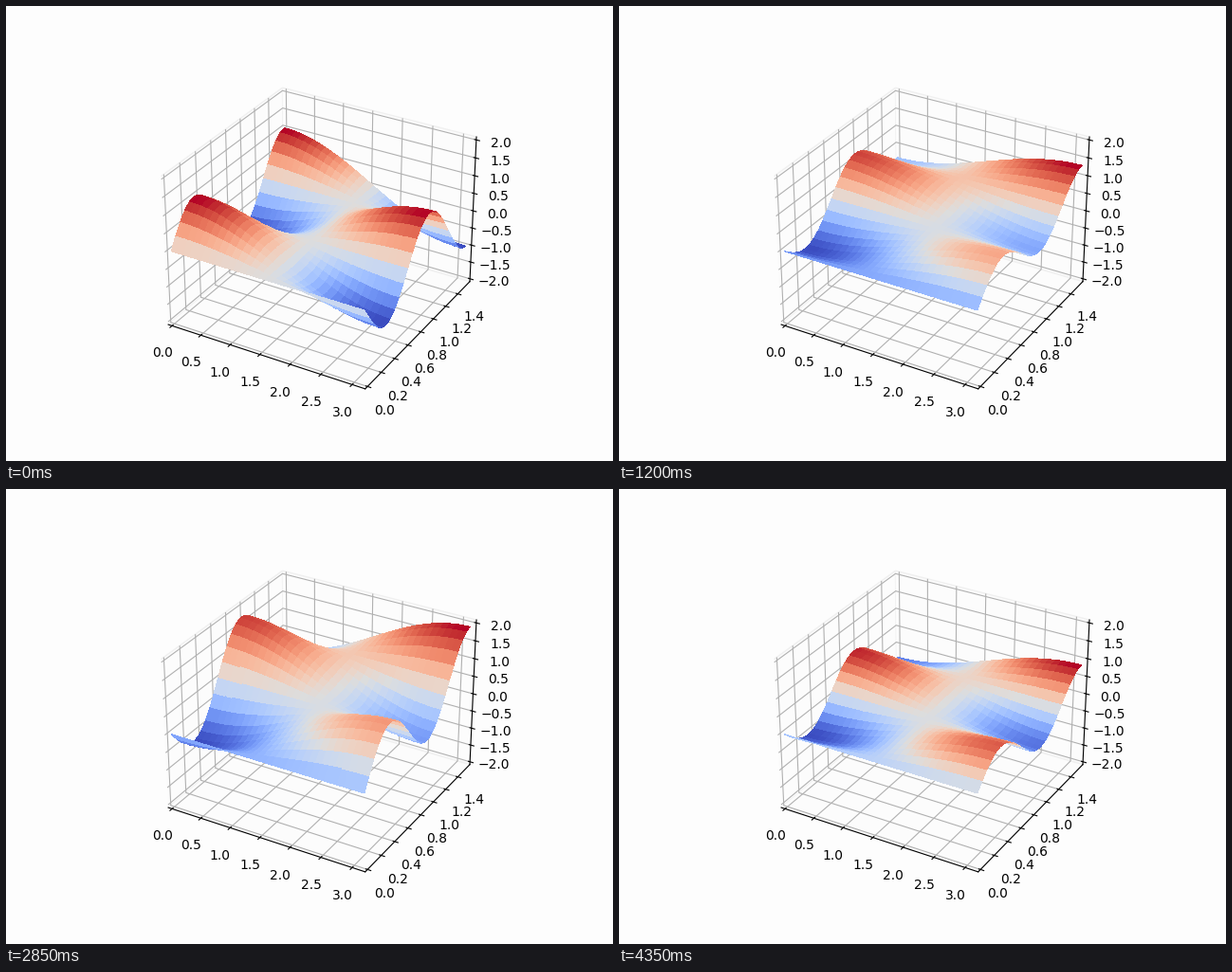
Recreate the animation shown at these times as a matplotlib script. Size 640 by 480 pixels, loop 4.5 s.

```python
import numpy as np
import matplotlib.pyplot as plt
from matplotlib.animation import FuncAnimation

FRAMES, INTERVAL, DT = 30, 150, 0.1
LX, LY = np.pi, np.pi / 2
PAD = 1 / 48  # gap between the data and the walls of the box

x, y = np.meshgrid(np.linspace(0, LX, 31), np.linspace(0, LY, 51))


def wave(t):
    """Two standing waves of a membrane held along y = 0."""
    slow = np.sin(y) * np.sin(t)
    fast = np.cos(x) * np.sin(5 * y) * np.cos(np.sqrt(26) * t)
    return slow + fast


def padded(low, high):
    gap = (high - low) * PAD
    return low - gap, high + gap


fig = plt.figure(figsize=(6.4, 4.8), dpi=100, facecolor="#fdfdfd")
ax = fig.add_subplot(projection="3d", facecolor="#fdfdfd")
ax.set(xlim=padded(0, LX), ylim=padded(0, LY), zlim=padded(-2, 2))
ax.set_xticks(np.arange(0, 3.1, 0.5))
ax.set_yticks(np.arange(0, 1.5, 0.2))
ax.set_zticks(np.arange(-2, 2.1, 0.5))
for axis in (ax.xaxis, ax.yaxis, ax.zaxis):
    axis.set_pane_color((0.99, 0.99, 0.99, 1))
    axis.pane.set_edgecolor("#f0f0f0")

surface = None


def draw(frame):
    global surface
    if surface is not None:
        surface.remove()
    surface = ax.plot_surface(x, y, wave(frame * DT), cmap="coolwarm",
                              rcount=50, ccount=50, linewidth=0,
                              antialiased=False)
    ax.set(xlim=padded(0, LX), ylim=padded(0, LY), zlim=padded(-2, 2))
    return [surface]


anim = FuncAnimation(fig, draw, frames=FRAMES, interval=INTERVAL,
                     init_func=lambda: [], repeat=True, repeat_delay=0)
plt.show()
```
